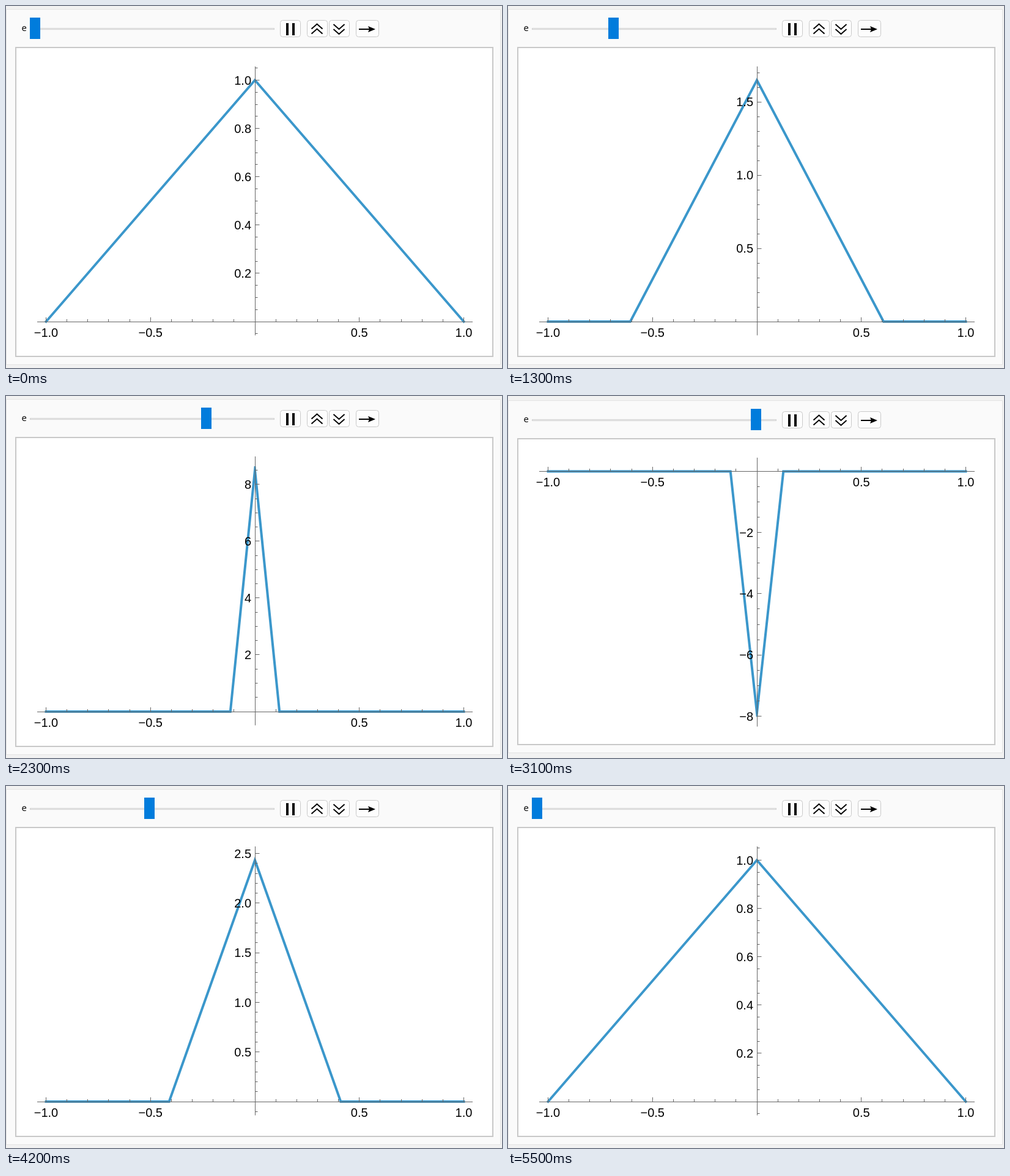
Animation of 811 by 593 pixels, one loop 6000 ms. Source, as an HTML page with a canvas:

```html
<!DOCTYPE html>
<html lang="en">
<head>
<meta charset="utf-8">
<title>Triangle pulse</title>
<style>
  html, body { margin: 0; height: 100%; overflow: hidden; background: #f2f2f2; }
  canvas { display: block; }
</style>
</head>
<body>
<canvas id="stage" width="811" height="593"></canvas>
<script>
const ctx = document.getElementById('stage').getContext('2d');
const LOOP = 6000, STEP = 100;
const X0 = 407, UNIT = 341.5;            // horizontal axis
const PEAK = 395.5, PAD = 22.5;          // vertical axis
const LABEL_HALF = 11.5;
const snap = v => Math.floor(v) + .5;

function stroke(points, color, width) {
  ctx.strokeStyle = color;
  ctx.lineWidth = width;
  ctx.beginPath();
  points.forEach(([x, y]) => ctx.lineTo(x, y));
  ctx.stroke();
}

function rect(x, y, w, h, color) {
  ctx.fillStyle = color;
  ctx.fillRect(x, y, w, h);
}

function box(x, y, w, h, radius, fill, border, width) {
  ctx.beginPath();
  ctx.roundRect(x, y, w, h, radius);
  ctx.fillStyle = fill;
  ctx.fill();
  ctx.strokeStyle = border;
  ctx.lineWidth = width;
  ctx.stroke();
}

function text(str, x, y, align, font = '20px "Liberation Sans", Arial, sans-serif') {
  ctx.font = font;
  ctx.textAlign = align;
  ctx.fillStyle = '#000';
  ctx.fillText(str, x, y);
}

// Pulse width: starts at 1, runs down past zero and back.
function widthAt(time) {
  const tick = Math.floor(time / STEP);
  const n = Math.min(tick, 59 - tick) - 4;
  return n <= 0 ? 1 : -.2 + .04887 * (25.5 - n);
}

// Smallest 1-2-5 step that gives at most seven labels.
function tickStep(top) {
  for (let power = .1; ; power *= 10)
    for (const m of [1, 2, 5])
      if (top / (m * power) <= 7.7) return { step: m * power, parts: m === 2 ? 4 : 5 };
}

function drawControls(e) {
  text('e', 25.5, 41, 'left', '15px "Open Sans", "Noto Sans", sans-serif');
  rect(39, 36, 400, 3, '#d2d2d2');
  rect(40, 37, 398, 1, '#ececec');
  rect(39 + Math.floor((1 - e) / 1.2 * 382), 19, 17, 35, '#007cdc');

  for (const [x, w] of [[448, 34], [492, 34], [528, 34], [572, 38]])
    box(x + .5, 23.5, w - 1, 27, 4, '#fdfdfd', '#c9c9c9', 1);
  rect(458, 28, 4, 20, '#000');
  rect(468, 28, 4, 20, '#000');
  for (const y of [0, 8]) {
    stroke([[499.5, 37.5 + y], [508.5, 29.5 + y], [517.5, 37.5 + y]], '#000', 2);
    stroke([[535.5, 30 + y], [544.5, 38 + y], [553.5, 30 + y]], '#000', 2);
  }
  stroke([[577, 38], [595, 38]], '#000', 2);
  ctx.fillStyle = '#000';
  ctx.beginPath();
  ctx.moveTo(604, 38);
  ctx.lineTo(592, 33);
  ctx.lineTo(594, 38);
  ctx.lineTo(592, 43);
  ctx.fill();
}

function drawPulse(e, zero, yOf) {
  const half = Math.abs(e) * UNIT, tip = yOf(1 / e), dir = Math.sign(e);
  ctx.save();
  ctx.beginPath();                       // trims the sharp corner at the tip
  ctx.rect(0, dir > 0 ? tip - 6.5 : 0, 811, dir > 0 ? 593 : tip + 6.5);
  ctx.clip();
  ctx.miterLimit = 200;
  ctx.lineCap = 'square';
  const points = [[X0 - half, zero], [X0, tip], [X0 + half, zero]];
  if (e < 1) {
    points.unshift([X0 - UNIT, zero]);
    points.push([X0 + UNIT, zero]);
  }
  stroke(points, '#3b97cb', 4);
  ctx.restore();
}

function drawAxes(zero, top, bottom, yOf, labels, { step, parts }) {
  const color = '#666';
  const line = (x1, y1, x2, y2) => stroke([[x1, y1], [x2, y2]], color, 1);
  const base = snap(zero), axis = X0 + .5;
  const format = (v, digits) => v.toFixed(digits).replace('-', '\u2212');

  line(51, base, 763, base);
  line(axis, top, axis, bottom);
  for (let i = -10; i <= 10; i++) {
    if (!i) continue;
    const x = X0 + i * UNIT / 10, major = i % 5 === 0;
    line(snap(x), base, snap(x), base - (major ? 7.5 : 4.5));
    if (major) text(format(i / 10, 1), x, zero + 24.5, 'center');
  }
  for (let i = -50; i <= 50; i++) {
    const y = yOf(i * step / parts);
    if (!i || y < top || y > bottom) continue;
    line(axis, snap(y), axis + (i % parts ? 4 : 7), snap(y));
  }
  for (const v of labels) text(format(v, step < .9 ? 1 : 0), 401, yOf(v) + 7.2, 'right');
}

function draw(time) {
  const e = widthAt(time), sign = Math.sign(e);
  const reach = PEAK + PAD, scale = PEAK * Math.abs(e);
  const ticks = tickStep(reach / scale);
  const labels = [];
  for (let i = 1; i * ticks.step * scale <= reach; i++) labels.push(sign * i * ticks.step);

  // A label beyond the axis end makes the whole panel taller.
  const last = Math.abs(labels[labels.length - 1]) * scale;
  const over = Math.max(0, Math.round(last + LABEL_HALF - reach));
  const above = sign > 0 ? over : 0, below = sign > 0 ? 5 : over;
  const height = 578 + above + below;
  const panelTop = Math.max(0, Math.floor((593 - height) / 2));

  rect(0, 0, 811, 593, '#f2f2f2');
  box(.5, panelTop + .5, 808, height - 1, 0, '#fafafa', '#e3e3e3', 1);
  box(16, panelTop + 63, 780, height - 77, 0, '#fff', '#c8c8c8', 2);

  ctx.save();
  ctx.translate(0, panelTop - 5);
  drawControls(e);
  ctx.restore();

  const top = panelTop + 94 + above, bottom = top + PEAK + 2 * PAD;
  const zero = sign > 0 ? top + reach : top + PAD;
  const yOf = v => zero - v * scale;
  drawPulse(e, zero, yOf);
  drawAxes(zero, top, bottom, yOf, labels, ticks);
}

function loop() {
  draw(performance.now() % LOOP);
  requestAnimationFrame(loop);
}
loop();
</script>
</body>
</html>
```
